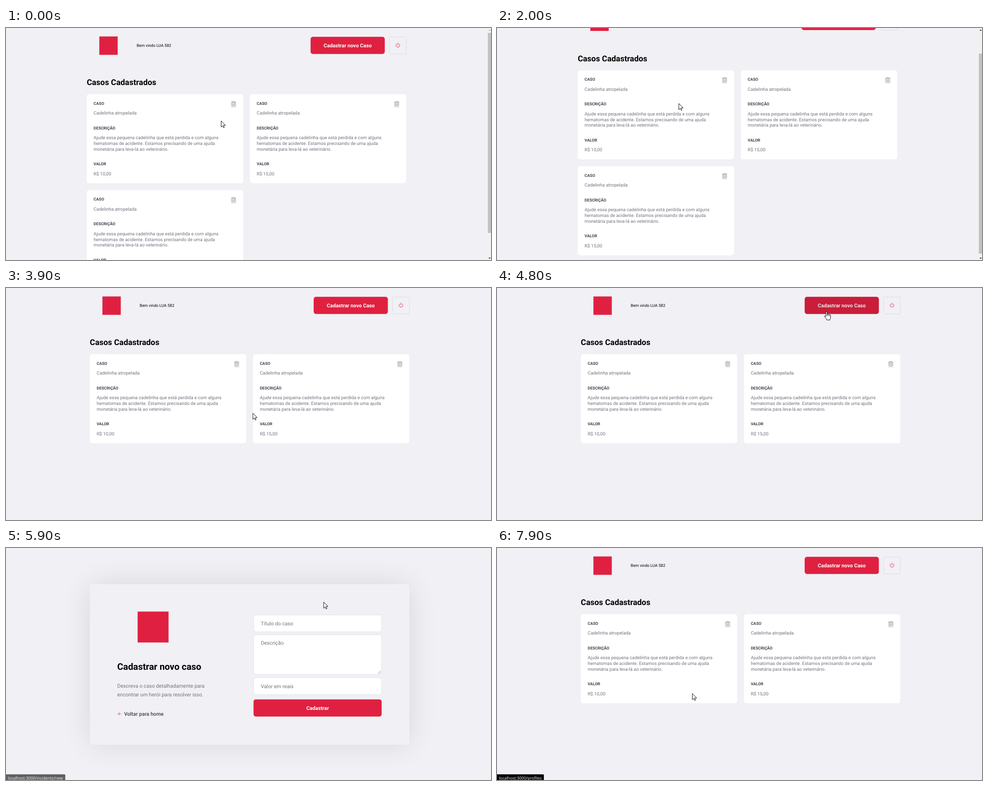
An HTML page that plays this animation: 1004 px wide and 480 px high, repeating every 8 s.

```html
<!DOCTYPE html>
<html lang="pt-BR">
<head>
<meta charset="utf-8">
<title>Casos Cadastrados</title>
<style>
  html, body { margin: 0; width: 100%; height: 100%; overflow: hidden; background: #f0f0f5; }
  svg { display: block; width: 1004px; height: 480px; }
  text { font-family: Roboto, "Liberation Sans", sans-serif; text-rendering: geometricPrecision; white-space: pre; }
  #status text { font-family: "Open Sans", "Noto Sans", sans-serif; }
  .icon { fill: none; stroke-width: 2; stroke-linecap: round; stroke-linejoin: round; }
</style>
</head>
<body>
<svg id="stage" viewBox="0 0 1004 480" xmlns="http://www.w3.org/2000/svg"></svg>
<script>
const RED = '#e02041', DARK = '#41414d', GREY = '#737380', LINE = '#dcdce6';
const LOOP = 8000, STEP = 100;

// The page is shown at this scale; sizes in CSS pixels go through px()
const px = n => n * .5907;
const RADIUS = px(8), BUTTON = px(60), BODY = px(18);

const text = (x, y, size, str, color, weight = 400, anchor = 'start') =>
  `<text x="${x}" y="${y}" font-size="${size}" fill="${color}" font-weight="${weight}" text-anchor="${anchor}">${str}</text>`;
const box = (x, y, w, h, r, fill, extra = '') =>
  `<rect x="${x}" y="${y}" width="${w}" height="${h}" rx="${r}" fill="${fill}" ${extra}/>`;
const icon = (x, y, size, color, d) =>
  `<path class="icon" transform="translate(${x} ${y}) scale(${size / 24})" stroke="${color}" d="${d}"/>`;
const button = (x, y, w, str) =>
  box(x, y, w, BUTTON, RADIUS, RED) + text(x + w / 2, y + 21.4, BODY, str, '#fff', 700, 'middle');

const TRASH = 'M3 6H21M19 6v14a2 2 0 0 1-2 2H7a2 2 0 0 1-2-2V6m3 0V4a2 2 0 0 1 2-2h4a2 2 0 0 1 2 2v2M10 11v6M14 11v6';
const POWER = 'M18.36 6.64a9 9 0 1 1-12.73 0M12 2v10';
const BACK = 'M19 12H5M12 19l-7-7 7-7';

function card(value, i) {
  const sections = {
    'CASO': ['Cadelinha atropelada'],
    'DESCRIÇÃO': [
      'Ajude essa pequena cadelinha que está perdida e com alguns',
      'hematomas de acidente. Estamos precisando de uma ajuda',
      'monetária para leva-lá ao veterinário.'
    ],
    'VALOR': [value]
  };
  const pad = px(24);
  let y = 21.9, rows = '';
  for (const [label, lines] of Object.entries(sections)) {
    rows += text(pad, y, px(14), label, DARK, 700);
    lines.forEach((line, n) => rows += text(pad, y + 20.5 + n * 11.9, px(16), line, GREY));
    y += 50.7 + (lines.length - 1) * 11.9;
  }
  return `<g id="card${i}" transform="translate(${337.7 * (i % 2)} ${137 + 198.5 * (i >> 1)})">
    ${box(0, 0, px(548), 184.2, RADIUS, '#fff')}${rows}
    ${box(298, 13.6, px(20), px(24), 0, '#efefef')}
    ${icon(298, 14, px(20), '#a0a0a8', TRASH)}
  </g>`;
}

// Laid out from the container's left edge
const listPage = `<g id="list">
  ${box(26, 17.5, 38, 38, 0, RED)}
  ${text(103.2, 39, px(14), 'Bem vindo LUA 582', '#000')}
  ${button(463.3, 18.3, px(260), 'Cadastrar novo Caso')}
  ${box(463.3, 18.3, px(260), BUTTON, RADIUS, '#000', 'id="dim"')}
  ${box(626.6, 18.7, 35, 35, px(4), 'none', `stroke="${LINE}"`)}
  ${icon(638.7, 29.9, BODY, RED, POWER)}
  ${text(0, 118.2, px(28), 'Casos Cadastrados', '#000', 700)}
  ${['R$ 10,00', 'R$ 15,00', 'R$ 15,00'].map(card).join('')}
</g>`;

const field = (y, h, baseline, hint) =>
  box(512.7, y, 265, h, RADIUS, '#fff', `stroke="${LINE}" stroke-width=".8"`) +
  text(527.5, baseline, BODY, hint, '#757575');
const panel = (fill, extra) => box(173.5, 75, px(1120), 332, RADIUS, fill, extra);

const formPage = `<g id="form">
  ${panel('#000', 'opacity=".1" filter="url(#blur)"')}${panel('#f0f0f5')}
  ${box(272.5, 131.5, 64, 64, 0, RED)}
  ${text(230.2, 252.2, px(32), 'Cadastrar novo caso', '#000', 700)}
  ${text(230.2, 288.9, BODY, 'Descreva o caso detalhadamente para', GREY)}
  ${text(230.2, 307.2, BODY, 'encontrar um herói para resolver isso.', GREY)}
  <g id="back">${icon(230.3, 338.4, px(16), RED, BACK)}
  ${text(244.4, 347, BODY, 'Voltar para home', DARK, 500)}</g>
  ${field(138.5, 35, 159.5, 'Título do caso')}
  ${field(179.5, 82, 199.5, 'Descrição')}
  <path d="M770 260l6-6M773.5 260l2.5-2.5" stroke="#777" stroke-width=".8"/>
  ${field(268.3, 35, 289.6, 'Valor em reais')}
  ${button(512.4, 313.2, px(449), 'Cadastrar')}
</g>`;

const scrollbar = `<g id="bar">
  ${box(996.5, 0, 8, 480, 0, '#f1f1f1')}
  ${box(997.5, 0, 7, 414, 0, '#c1c1c1', 'id="thumb"')}
  <path id="up" d="M998.8 5.5h4.6l-2.3-2.6z"/><path id="down" d="M998.8 475.2h4.6l-2.3 2.6z"/>
</g>`;

const HAND = 'M-1.3 10.2V1.3a1.3 1.3 0 0 1 2.6 0V6.2q.2-1 1.3-1t1.3 1.2q.2-.8 1.2-.8t1.2 1.2q.2-.7 1-.7 1.1 0 1.1 1.4V12q0 2-1.2 3.2V17H.4V15.6L-3.6 10.6q-1-1.4 0-2.2.9-.5 2.3 1.8z';
const FINGERS = 'M1.3 6.2v3M3.9 6.6v2.6M6.3 7v2.2';

document.getElementById('stage').innerHTML = `
  <defs><filter id="blur" filterUnits="userSpaceOnUse" x="0" y="-60" width="1004" height="600">
    <feGaussianBlur stdDeviation="${px(50)}"/></filter></defs>
  ${box(0, 0, 1004, 480, 0, '#f0f0f5')}
  ${listPage}${formPage}${scrollbar}
  <g id="status"><path id="bubble"/>${text(4, 478.7, 8.35, '', '#fff')}</g>
  <g id="cursor" stroke="#000" stroke-width=".9" stroke-linejoin="round" fill="#fff">
    <path id="arrow" d="M.4.2V13L3.4 10.2 5.3 14.5 7.1 13.7 5.2 9.4H9.3z"/>
    <g id="hand"><path d="${HAND}"/><path d="${FINGERS}" fill="none" stroke-width=".7"/></g>
  </g>`;

const el = id => document.getElementById(id);
const show = (id, on) => el(id).setAttribute('display', on ? 'inline' : 'none');
const move = (id, x, y) => el(id).setAttribute('transform', `translate(${x} ${y})`);
const within = (t, a, b) => t >= a && t < b;
const mix = (a, b, u) => a + (b - a) * u;
const ramp = (t, start, length) => Math.min(1, Math.max(0, (t - start) / length));
const easeOut = u => 1 - (1 - u) ** 2;

const curve = (a, c, b) => u => a.map((v, i) => mix(mix(v, c[i], u), mix(c[i], b[i], u), u));
const line = (a, b) => u => a.map((v, i) => mix(v, b[i], u));
// Three quarters of an ellipse, clockwise from its left end
const loop = (cx, cy, rx, ry) => u => {
  const a = Math.PI * (1 + 1.5 * u);
  return [cx + rx * Math.cos(a), cy + ry * Math.sin(a)];
};

// Pointer strokes; it rests between them
const first = [445, 192], read = [376, 156], bin = [477, 300], create = [688, 42], mid = [577, 234], back = [305, 343];
const strokes = [
  { from: 0, to: 100, at: line(first, [445, 172]) },
  { from: 200, to: 1100, at: loop(498, 169, 53, 70) },
  { from: 1100, to: 1800, at: curve([498, 239], [440, 460], read) },
  { from: 2000, to: 3000, at: curve(read, [440, 370], bin) },
  { from: 3800, to: 5000, at: line(bin, create), ease: easeOut },
  { from: 5700, to: 6600, at: curve(create, [660, 125], mid), ease: easeOut },
  { from: 6600, to: 7500, at: curve(mid, [454, 295], back) },
  { from: 7500, to: 7900, at: line(back, [404, 301]) }
];

function pointer(t) {
  const { from, to, at, ease = u => u } = strokes.findLast(s => t >= s.from);
  return at(ease(ramp(t, from, to - from)));
}

function draw(t) {
  const removed = t >= 3700;
  const form = within(t, 5600, 7600);
  const scroll = within(t, 2000, 3700) ? (t < 2100 ? 49.5 : 55.5) : 0;
  const onBin = within(t, 2900, 3700), onCreate = within(t, 4800, 5600), onBack = within(t, 7400, 7600);

  show('list', !form);
  show('form', form);
  show('card2', !removed);
  move('list', removed ? 173.6 : 167.2, -scroll);
  el('dim').setAttribute('opacity', onCreate ? .1 : 0);
  el('back').setAttribute('opacity', onBack ? .8 : 1);

  show('bar', !removed);
  el('thumb').setAttribute('y', 10 + scroll * .865);
  el('up').setAttribute('fill', scroll ? '#222' : '#a3a3a3');
  el('down').setAttribute('fill', scroll > 50 ? '#a3a3a3' : '#222');

  const late = t > 7000;
  el('bubble').setAttribute('d', `M0 468.3H${late ? 95 : 120.7}q2 0 2 2V480H0z`);
  el('status').lastChild.textContent = 'localhost:3000/' + (late ? 'profiles' : 'incidents/new');
  el('status').setAttribute('opacity', ramp(t, 4800, 200) - ramp(t, 5700, 500) + ramp(t, 7400, 200));

  const hand = onBin || onCreate || onBack;
  show('hand', hand);
  show('arrow', !hand);
  move('cursor', ...pointer(t));
}

const start = performance.now();
function tick() {
  const t = (performance.now() - start) % LOOP;
  draw(Math.floor(t / STEP) * STEP);
  requestAnimationFrame(tick);
}
tick();
</script>
</body>
</html>
```
